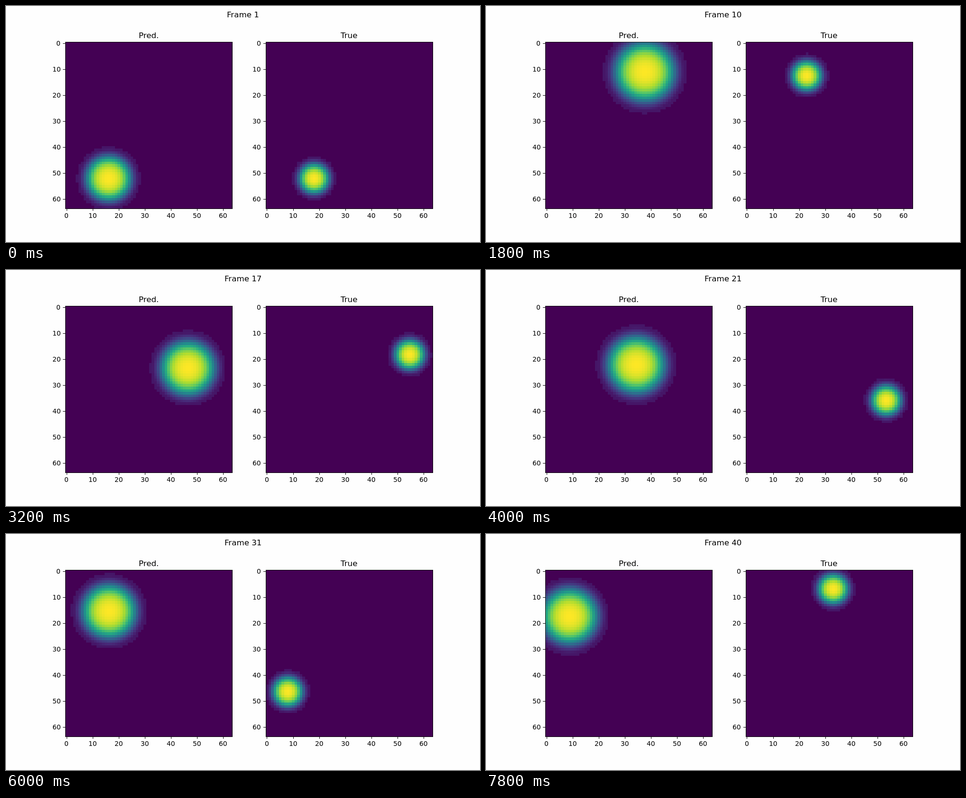
An HTML page with a canvas that plays this animation: 1000x500 px, repeating every 8000 ms.

```html
<!DOCTYPE html>
<html>
<head>
<meta charset="utf-8">
<style>
  html, body { margin: 0; width: 100%; height: 100%; overflow: hidden; background: #fefefe; }
  canvas { display: block; }
</style>
</head>
<body>
<canvas id="stage" width="1000" height="500"></canvas>
<script>
const ctx = document.getElementById('stage').getContext('2d');
const STEP = 200, STEPS = 40, GRID = 64, PIXELS = 353, AXIS = 352.27;
const LEFT = 125, RIGHT = 547.73, TOP = 76.36;

// Viridis, evenly spaced stops
const STOPS = ['440154', '472d7b', '3b528b', '2c728e', '21918c', '28ae80', '5ec962', 'addc30', 'fde725']
  .map(hex => [0, 2, 4].map(i => parseInt(hex.substr(i, 2), 16)));

// Key points of the predicted path: step, x, y
const PATH = [
  [0, 16.1, 52], [2, 11.5, 38], [5, 21.4, 19.2], [9, 37.6, 11], [13, 44, 27.5],
  [16, 46.4, 23.4], [24, 22.2, 20.9], [27, 14, 17], [30, 16.3, 15.4], [39, 8.8, 17.3]
];

const mix = (a, b, f) => a.map((v, n) => v + (b[n] - v) * f);
const sigmoid = z => 1 / (1 + Math.exp(-z));

function viridis(v) {
  const p = v * (STOPS.length - 1), i = Math.min(Math.floor(p), STOPS.length - 2);
  return `rgb(${mix(STOPS[i], STOPS[i + 1], p - i).map(Math.round)})`;
}

function predicted(k) {
  const i = Math.max(1, PATH.findIndex(p => p[0] >= k));
  const [a, b] = [PATH[i - 1], PATH[i]];
  const [, x, y] = mix(a, b, (k - a[0]) / (b[0] - a[0]));
  const radius = 9.7 - 0.02 * k + 0.53 * Math.cos((k - 6) * Math.PI / 9) - 2 * Math.exp(-k / 1.5);
  return [x, y, radius];
}

// Reflects a straight run between the walls 0 and 63
function bounce(u) {
  const m = Math.abs(u) % 126;
  return Math.min(m, 126 - m);
}

// Text starts on whole pixels; align is the share of the width left of x
function text(str, x, y, size, align = 0.5) {
  ctx.font = `${size}px "DejaVu Sans", sans-serif`;
  ctx.fillText(str, Math.round(x - ctx.measureText(str).width * align), Math.round(y));
}

function heatmap(left, x, y, radius, sharpness) {
  const x0 = Math.round(left), y0 = Math.round(TOP);
  const edge = i => Math.round(i * PIXELS / GRID);
  ctx.fillStyle = viridis(0);
  ctx.fillRect(x0, y0, PIXELS, PIXELS);
  for (let row = 0; row < GRID; row++) {
    for (let col = 0; col < GRID; col++) {
      const q = ((col - x) ** 2 + (row - y) ** 2) / radius ** 2;
      const v = sigmoid(sharpness * (1 - q)) / sigmoid(sharpness);
      if (v < 0.031) continue;
      ctx.fillStyle = viridis(Math.max(v, 0.06));
      ctx.fillRect(x0 + edge(col), y0 + edge(row), edge(col + 1) - edge(col), edge(row + 1) - edge(row));
    }
  }
}

function axes(left, title) {
  const x0 = Math.round(left);
  ctx.strokeStyle = ctx.fillStyle = '#000';
  ctx.strokeRect(x0 + 0.5, 76.5, 352, 353);
  for (let n = 0; n <= 60; n += 10) {
    const offset = (n + 0.5) * AXIS / GRID, x = left + offset, y = TOP + offset;
    ctx.fillRect(Math.round(x), 429, 1, 5);
    ctx.fillRect(x0 - 5, Math.round(y), 5, 1);
    text(n, x, 449, 13.89);
    text(n, left - 9.7, y + 5, 13.89, 1);
  }
  text(title, left + AXIS / 2, 68, 16.67);
}

function draw(k) {
  ctx.fillStyle = '#fefefe';
  ctx.fillRect(0, 0, 1000, 500);
  heatmap(LEFT, ...predicted(k), 2.1);
  heatmap(RIGHT, bounce(4.537 * k - 18), bounce(4.39 * k - 52), 4.7, 1.6);
  axes(LEFT, 'Pred.');
  axes(RIGHT, 'True');
  text(`Frame ${k + 1}`, 500, 24, 16.67);
}

let shown = -1;
function tick() {
  const k = Math.floor(performance.now() / STEP) % STEPS;
  if (k !== shown) draw(shown = k);
  requestAnimationFrame(tick);
}
tick();
</script>
</body>
</html>
```
